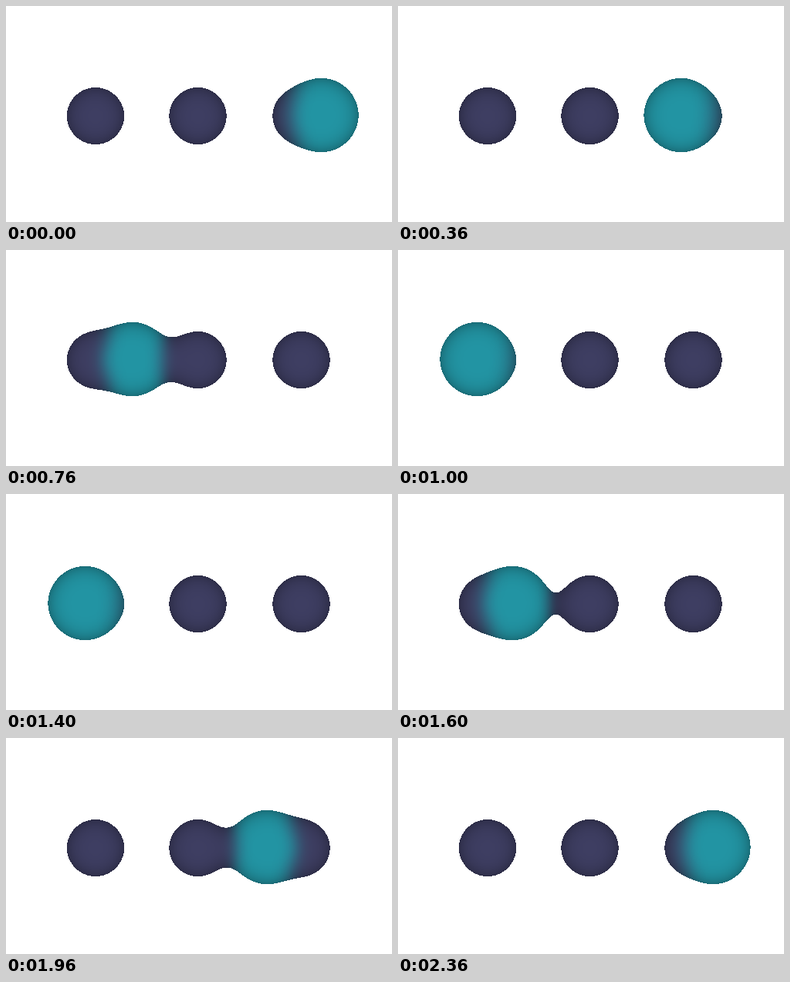
Write an HTML page with a canvas that moves like this. It is 500 by 281 pixels and loops after 2400 ms.

```html
<!DOCTYPE html>
<html lang="en">
<head>
<meta charset="utf-8">
<title>Gooey dots</title>
<style>
  html, body { margin: 0; width: 100%; height: 100%; overflow: hidden; background: #fff; }
  canvas { display: block; }
</style>
</head>
<body>
<canvas id="view" width="500" height="281"></canvas>
<script>
const W = 500, H = 281, LOOP = 2400, STEP = 40, BLUR = 14;
const DARK = [62, 62, 98], TEAL = [34, 148, 163];

const view = document.getElementById('view').getContext('2d', { willReadFrequently: true });
const layer = document.createElement('canvas');
layer.width = W;
layer.height = H;
const shapes = layer.getContext('2d');

function disc(x, y, r, color) {
  shapes.fillStyle = color;
  shapes.beginPath();
  shapes.arc(x, y, r, 0, 2 * Math.PI);
  shapes.fill();
}

// Swings right, left, right with a soft stop at each end.
function swing(t) {
  const tri = 2 * Math.abs(2 * t / LOOP - 1) - 1;
  return Math.sign(tri) * (1 - Math.pow(1 - Math.abs(tri), 2.6));
}

function draw(t) {
  // Red marks the resting dots, green the moving one.
  shapes.clearRect(0, 0, W, H);
  for (const x of [116, 248.5, 382.5]) disc(x, 143, 39.6, '#f00');
  disc(251 + 157.5 * swing(t), 142, 50, '#0f0');

  view.clearRect(0, 0, W, H);
  view.filter = `blur(${BLUR}px)`;
  view.drawImage(layer, 0, 0);
  view.filter = 'none';

  // Cut the blurred union at half coverage, then colour and shade the inside.
  const image = view.getImageData(0, 0, W, H), px = image.data;
  for (let i = 0; i < px.length; i += 4) {
    const depth = 2 * px[i + 3] / 255 - 1;
    if (depth < 0) {
      px[i + 3] = 0;
      continue;
    }
    const mix = Math.pow(px[i + 1] / (px[i] + px[i + 1]), 3);
    const shade = 0.7 + 0.3 * Math.pow(depth, 0.6);
    for (let c = 0; c < 3; c++) px[i + c] = shade * (DARK[c] + (TEAL[c] - DARK[c]) * mix);
    px[i + 3] = 255;
  }
  view.putImageData(image, 0, 0);
}

const start = performance.now();
function tick() {
  const t = (performance.now() - start) % LOOP;
  draw(Math.floor(t / STEP) * STEP);
  requestAnimationFrame(tick);
}
tick();
</script>
</body>
</html>
```
